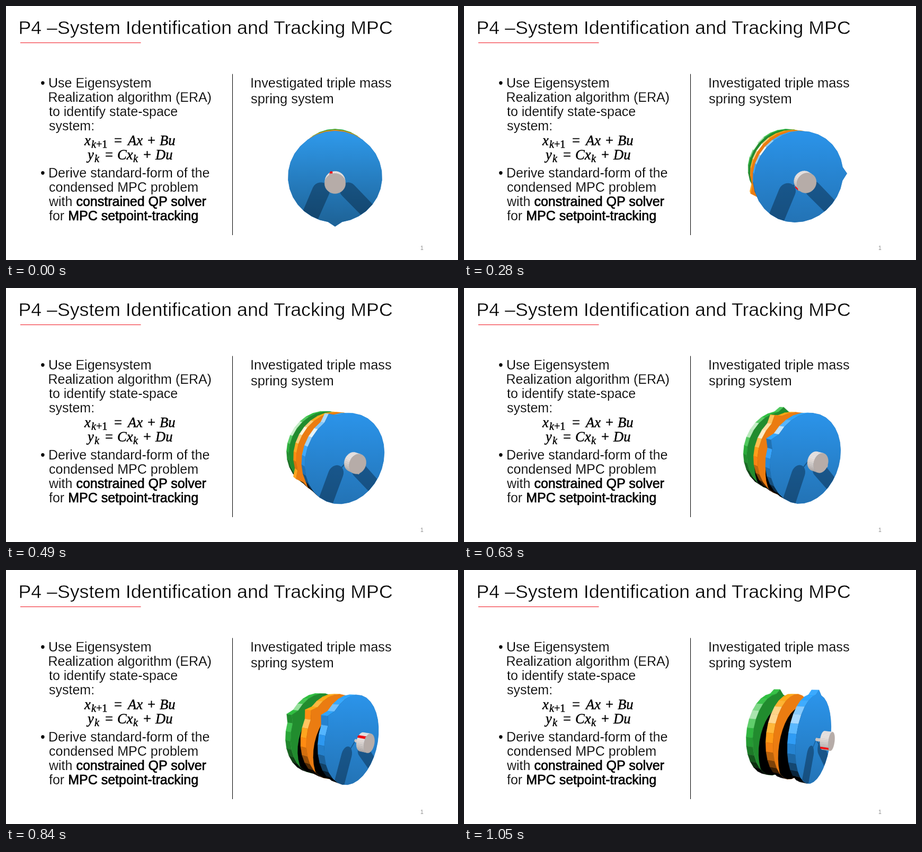
Animation of 853x480 px, one loop 1.12 s. Source, as an HTML page with a canvas:

```html
<!DOCTYPE html>
<html lang="en">
<head>
<meta charset="utf-8">
<title>System Identification and Tracking MPC</title>
<style>
  html, body { margin: 0; width: 100%; height: 100%; overflow: hidden; background: #fff; }
  svg, canvas { position: absolute; left: 0; top: 0; width: 853px; height: 480px; }
  /* The thin white stroke lightens the weight of the letters. */
  text { font-family: "Liberation Sans", Arial, sans-serif; fill: #000; stroke: #fff; stroke-width: .25px; white-space: pre; }
  .title { font-size: 35.7px; stroke-width: .5px; }
  .left { font-size: 25px; }
  .right { font-size: 25.4px; }
  .strong { stroke: #000; stroke-width: .7px; }
  .math text { font: italic 26.5px "Liberation Serif", "Times New Roman", serif; stroke: #000; stroke-width: .45px; }
  .math .sub { font-size: 20px; }
  .math .up { font-style: normal; }
  .page { font-size: 10.5px; fill: #8b8b8b; stroke: none; }
</style>
</head>
<body>
<svg viewBox="0 0 853 480">
  <text class="title" x="23.500" y="53">P4 –System Identification and Tracking MPC</text>
  <path d="M27 69.5H254.500" stroke="#f0141e" fill="none"/>
  <path d="M427.500 128.500V433" stroke="#000" fill="none"/>
  <g class="left">
    <text x="65" y="154">•</text>
    <text x="80" y="154">Use Eigensystem</text>
    <text x="79.500" y="181">Realization algorithm (ERA)</text>
    <text x="81" y="208">to identify state-space</text>
    <text x="81" y="235">system:</text>
    <text x="65" y="324">•</text>
    <text x="80" y="324">Derive standard-form of the</text>
    <text x="81" y="351">condensed MPC problem</text>
    <text x="81" y="378">with <tspan class="strong">constrained QP solver</tspan></text>
    <text x="81" y="405">for <tspan class="strong">MPC setpoint-tracking</tspan></text>
  </g>
  <g class="math">
    <text x="148" y="263">x</text><text class="sub" x="161" y="268">k<tspan class="up">+1</tspan></text>
    <text class="up" x="204" y="263">=</text><text x="230" y="263">Ax</text>
    <text class="up" x="267" y="263">+</text><text x="290" y="263">Bu</text>
    <text x="154" y="290">y</text><text class="sub" x="167" y="295">k</text>
    <text class="up" x="187" y="290">=</text><text x="210" y="290">Cx</text>
    <text class="sub" x="240" y="295">k</text>
    <text class="up" x="259" y="290">+</text><text x="282" y="290">Du</text>
  </g>
  <g class="right">
    <text x="461" y="154">Investigated triple mass</text>
    <text x="462" y="184">spring system</text>
  </g>
  <text class="page" x="782" y="461">1</text>
</svg>
<canvas id="view" width="853" height="480"></canvas>
<script>
const ctx = document.getElementById('view').getContext('2d');
const STEP = 70, COUNT = 16, RAD = Math.PI / 180;
const PIVOT = [621, 315], CAMERA = 435, TILT = 13 * RAD, YAW_STEP = 4.1 * RAD;
const RADIUS = 79.3, THICK = 14, SPACING = 40;
const CAST = [15, -24];

// Angles in degrees, counted from the top towards the left.
const KEYS = [0, 2, 5, 7, 10, 12, 15];
const TURN = {
  blue: [180, 195, 314, 385, 430, 414, 355],
  orange: [180, 150, 98, 112, 0, 50, -60],
  green: [180, 190, 250, 300, 385, 418, 354],
  motor: [24, 20, 178, 187, 280, 405, 490]
};
const COLOR = { blue: [37, 132, 210], orange: [255, 135, 18], green: [36, 152, 50], motor: [196, 186, 182] };

let yaw = 0;

function angleAt(values, step) {
  const slope = i => {
    const a = Math.max(0, i - 1), b = Math.min(KEYS.length - 1, i + 1);
    return (values[b] - values[a]) / (KEYS[b] - KEYS[a]);
  };
  let i = 0;
  while (i < KEYS.length - 2 && step >= KEYS[i + 1]) i++;
  const h = KEYS[i + 1] - KEYS[i], u = (step - KEYS[i]) / h, v = 1 - u;
  return v * v * (1 + 2 * u) * values[i] + u * v * v * h * slope(i)
    + u * u * (3 - 2 * u) * values[i + 1] - u * u * v * h * slope(i + 1);
}

function project([x, y, z]) {
  const c = Math.cos(yaw), s = Math.sin(yaw), near = z * c - x * s;
  const depth = y * Math.sin(TILT) + near * Math.cos(TILT);
  const k = CAMERA / (CAMERA - depth);
  return [PIVOT[0] + k * (x * c + z * s),
    PIVOT[1] - k * (y * Math.cos(TILT) - near * Math.sin(TILT))];
}

const polar = (r, deg) => [-r * Math.sin(deg * RAD), r * Math.cos(deg * RAD)];
const place = (points, z) => points.map(([x, y]) => project([x, y, z]));
const rgb = c => `rgb(${c.map(v => Math.min(255, Math.round(v)))})`;
const mix = (a, b, k) => a.map((v, i) => v + (b[i] - v) * k);
const scale = (c, k) => c.map(v => v * k);

function trace(...shapes) {
  ctx.beginPath();
  for (const shape of shapes) {
    shape.forEach((p, i) => i ? ctx.lineTo(...p) : ctx.moveTo(...p));
    ctx.closePath();
  }
}

function paint(shape, color) {
  trace(shape);
  ctx.fillStyle = ctx.strokeStyle = color;
  ctx.lineWidth = .5;
  ctx.fill();
  ctx.stroke();
}

function circle(r, cx = 0, cy = 0) {
  return Array.from({ length: 40 }, (_, i) => {
    const [x, y] = polar(r, i * 9);
    return [x + cx, y + cy];
  });
}

// Disc outline with one pointed tooth at the given angle.
function outline(r, turn, tooth) {
  const points = [polar(r * tooth, turn), polar(r, turn + 9)];
  for (let d = 20; d <= 340; d += 320 / 28) points.push(polar(r, turn + d));
  points.push(polar(r, turn + 351));
  return points;
}

function capsule([ax, ay], [bx, by], r) {
  const dir = Math.atan2(by - ay, bx - ax), points = [];
  for (let i = 0; i <= 12; i++) {
    const a = dir + Math.PI / 2 + i * Math.PI / 12;
    points.push([ax + r * Math.cos(a), ay + r * Math.sin(a)]);
  }
  const nx = -Math.sin(dir) * r, ny = Math.cos(dir) * r;
  points.push([bx - nx, by - ny], [bx + nx, by + ny]);
  return points;
}

// Two lamps at the upper left and upper right, with a highlight on the left.
function sideColor(base, nx, ny) {
  const light = (Math.max(0, ny - nx) + Math.max(0, ny + nx)) / Math.sqrt(3);
  const angle = Math.atan2(-nx, ny) / RAD;
  const shine = (.3 + .65 * Math.cos(yaw)) * Math.exp(-(((angle - 52) / 14) ** 2));
  return rgb(mix(scale(base, Math.min(1.25, light * 1.7)), [255, 255, 250], shine));
}

function drawSides(points, z0, z1, colorOf) {
  const front = place(points, z1), back = place(points, z0);
  points.forEach((p, i) => {
    const j = (i + 1) % points.length, q = points[j];
    const quad = [front[i], front[j], back[j], back[i]];
    const area = quad.reduce((sum, [x, y], k) => {
      const [u, v] = quad[(k + 1) % 4];
      return sum + x * v - u * y;
    }, 0);
    if (area <= 0) return;
    const dx = q[0] - p[0], dy = q[1] - p[1], len = Math.hypot(dx, dy);
    paint(quad, colorOf(dy / len, -dx / len, i));
  });
  return front;
}

function drawDisc(name, slot, step, shadeFace) {
  const mid = slot * SPACING, z = mid + THICK / 2, base = COLOR[name];
  const points = outline(RADIUS, angleAt(TURN[name], step), 1.1);
  const face = drawSides(points, mid - THICK / 2, z, (nx, ny) => sideColor(base, nx, ny));
  paint(face, rgb(scale(base, .92)));
  ctx.save();
  trace(face);
  ctx.clip();
  shadeFace(z, face, step);
  ctx.restore();
}

// Both lamps are blocked where the two cast discs overlap.
function castDisc(z) {
  const [dx, dy] = CAST;
  trace(place(circle(RADIUS, -dx, dy), z));
  ctx.clip();
  paint(place(circle(RADIUS, dx, dy), z), '#000');
}

function castMotor(z, face, step) {
  const k = Math.min(1, step / 3), fill = ctx.createLinearGradient(0, 235, 0, 408);
  fill.addColorStop(0, rgb(mix([47, 154, 236], [43, 148, 234], k)));
  fill.addColorStop(1, rgb(mix([30, 100, 153], [35, 115, 181], k)));
  paint(face, fill);
  const left = [-24, -21], right = [22, -20];
  trace(...[
    capsule(left, [-60, -105], 15), capsule([0, 0], left, 1.2),
    capsule(right, [88, -90], 14), capsule([0, 0], right, 1.2)
  ].map(s => place(s, z)));
  ctx.fillStyle = 'rgba(4,24,44,.4)';
  ctx.fill();
}

function drawMotor(step) {
  const grey = COLOR.motor, light = [232, 225, 222];
  paint(drawSides(circle(2.2), 47, 61, () => rgb(mix(grey, light, .3))), rgb(grey));
  const points = outline(16.4, angleAt(TURN.motor, step), 1.08), last = points.length - 1;
  const face = drawSides(points, 61, 76, (nx, ny, i) => {
    if (i === 0 || i === last) return '#f5080c';
    return rgb(mix(scale(grey, .85), light, Math.max(0, Math.min(1, .65 + ny * .6))));
  });
  paint(face, '#b6aca8');
}

function draw(step) {
  yaw = step * YAW_STEP;
  ctx.clearRect(0, 0, 853, 480);
  drawDisc('green', -1, step, castDisc);
  drawDisc('orange', 0, step, castDisc);
  drawDisc('blue', 1, step, castMotor);
  drawMotor(step);
}

const start = performance.now();
let shown = -1;
function tick() {
  const step = Math.floor((performance.now() - start) / STEP) % COUNT;
  if (step !== shown) draw(shown = step);
  requestAnimationFrame(tick);
}
tick();
</script>
</body>
</html>
```
